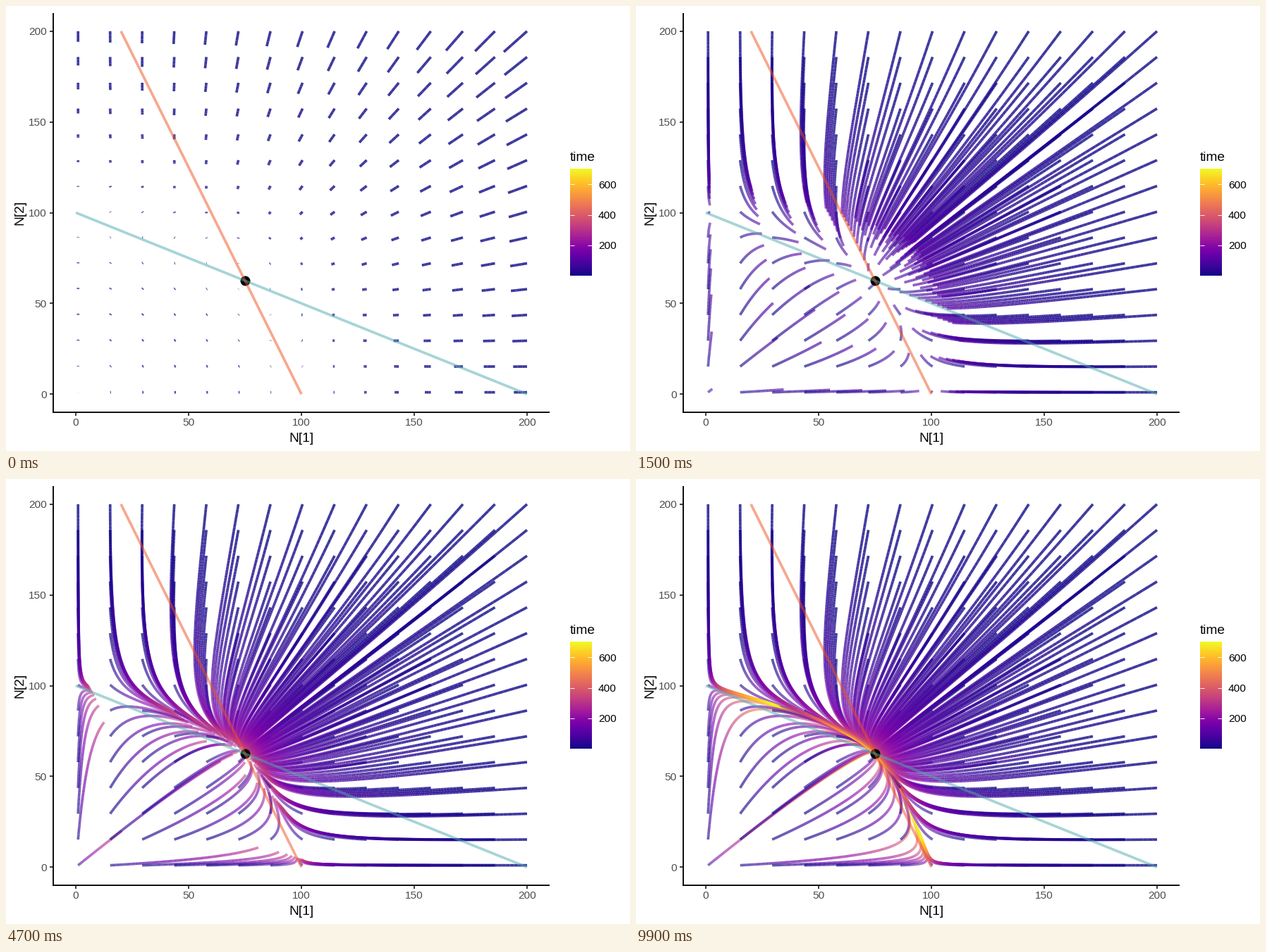
These frames come from a looping animation (885 px wide and 632 px high, 10000 ms). A matplotlib script:

```python
import numpy as np
import matplotlib.pyplot as plt
from matplotlib.animation import FuncAnimation
from matplotlib.collections import PathCollection
from matplotlib.path import Path

W, H, DPI = 885, 632, 100
FRAMES, STEPS, RATE = 100, 699, 0.01
LEFT, RIGHT, TOP, BOTTOM = 67, 771, 10, 577
PT = 72 / DPI
ALPHA = 0.8
PIECE = 2.0  # shortest drawn piece of a trajectory, in pixels

plt.rcParams["font.family"] = "Liberation Sans"
plasma = plt.get_cmap("plasma")


def px(n):
    return LEFT + (RIGHT - LEFT) * (n + 10) / 220


def py(n):
    return BOTTOM - (BOTTOM - TOP) * (n + 10) / 220


def simulate():
    """Discrete two-species competition from a grid of starting densities."""
    start = np.linspace(1, 200, 15)
    n1, n2 = (g.ravel() for g in np.meshgrid(start, start))
    out = np.empty((n1.size, STEPS + 1, 2))
    for k in range(STEPS + 1):
        out[:, k] = np.column_stack([px(n1), py(n2)])
        d1 = RATE * n1 * (1 - (n1 + 0.4 * n2) / 100)
        d2 = RATE * n2 * (1 - (n2 + 0.5 * n1) / 100)
        n1, n2 = n1 + d1, n2 + d2
    return out


def split(track):
    """Step indices that cut a track into pieces of at least PIECE pixels."""
    step = np.hypot(*np.diff(track, axis=0).T)
    cuts, run = [0], 0.0
    for k, d in enumerate(step, 1):
        run += d
        if run >= PIECE:
            cuts.append(k)
            run = 0.0
    if cuts[-1] < STEPS:
        cuts.append(STEPS)
    return np.array(cuts)


def opacity(length, count):
    """Opacity of a chain of translucent butt-ended steps of subpixel size."""
    step = length / count
    seam = ALPHA ** 2 / 6
    target = np.where(step > 1, ALPHA - seam / np.maximum(step, 1),
                      0.55 + (ALPHA - seam - 0.55) * step)
    return np.minimum(target + target ** 2 / 6 / np.maximum(length, 1), ALPHA)


tracks = simulate()
cuts = [split(t) for t in tracks]
owner = np.concatenate([np.full(len(c) - 1, i) for i, c in enumerate(cuts)])
first = np.concatenate([c[:-1] for c in cuts])
last = np.concatenate([c[1:] for c in cuts])

ends = np.stack([tracks[owner, first], tracks[owner, last]], axis=1)
lengths = np.hypot(*(ends[:, 1] - ends[:, 0]).T)
colors = plasma((first + last) / 2 / STEPS)
colors[:, 3] = opacity(lengths, last - first)
pieces = [Path(e) for e in ends]

fig = plt.figure(figsize=(W / DPI, H / DPI), dpi=DPI, facecolor="white")
ax = fig.add_axes([0, 0, 1, 1])
ax.set_xlim(0, W)
ax.set_ylim(H, 0)
ax.axis("off")


def line(xs, ys, color, width, **kw):
    ax.plot(xs, ys, color=color, lw=width * PT, solid_capstyle="butt", **kw)


def label(x, y, text, size, color="black", ha="left", rotation=0):
    ax.text(x, y, text, fontsize=size * PT, color=color, ha=ha, va="baseline",
            rotation=rotation, rotation_mode="anchor")


def draw_axes():
    line([LEFT, LEFT], [BOTTOM + 0.9, TOP], "black", 1.85, zorder=4)
    line([LEFT - 0.9, RIGHT], [BOTTOM, BOTTOM], "black", 1.85, zorder=4)
    for v in range(0, 201, 50):
        line([px(v)] * 2, [BOTTOM, BOTTOM + 4.8], "#333333", 1.85)
        line([LEFT - 4.8, LEFT], [py(v)] * 2, "#333333", 1.85)
        label(px(v), 596.5, str(v), 15.4, "#4D4D4D", "center")
        label(58, py(v) + 5.5, str(v), 15.4, "#4D4D4D", "right")
    label((LEFT + RIGHT) / 2, 619, "N[1]", 19.2, ha="center")
    label(24, (TOP + BOTTOM) / 2, "N[2]", 19.2, ha="center", rotation=90)


def draw_legend():
    x0, x1, y0, y1 = 800, 830.5, 231.7, 383
    ramp = np.linspace(1, 0, 256)[:, None]
    ax.imshow(ramp, cmap=plasma, extent=[x0, x1, y1, y0], aspect="auto",
              interpolation="bilinear")
    for v in (200, 400, 600):
        y = y1 - (y1 - y0) * (v - 1) / STEPS
        line([x0, x0 + 6], [y, y], "white", 0.9)
        line([x1 - 6, x1], [y, y], "white", 0.9)
        label(840, y + 5.5, str(v), 15.4)
    label(800, 220, "time", 19.2)


draw_axes()
draw_legend()
ax.set_xlim(0, W)
ax.set_ylim(H, 0)

flow = PathCollection([], facecolors="none", linewidths=3.7 * PT,
                      transform=ax.transData, zorder=3)
flow.set_snap(False)
ax.add_collection(flow, autolim=False)

ax.plot(px(75), py(62.5), "o", color="black", ms=14 * PT, mew=0, zorder=5)
line([px(100), px(20)], [py(0), py(200)], "#EF521E", 3.7, alpha=0.5, zorder=6)
line([px(0), px(200)], [py(100), py(0)], "#50AAAE", 3.7, alpha=0.5, zorder=7)


def update(i):
    now = min(int(STEPS / (FRAMES - 1) * (i + 0.5)), STEPS)
    shown = np.flatnonzero(first < now)
    paths = []
    for k in shown:
        if last[k] <= now:
            paths.append(pieces[k])
        else:
            t = tracks[owner[k]]
            paths.append(Path([t[first[k]], t[now]]))
    flow.set_paths(paths)
    flow.set_edgecolor(colors[shown])
    return [flow]


anim = FuncAnimation(fig, update, frames=FRAMES, interval=100,
                     repeat=True, repeat_delay=0, blit=False)
plt.show()
```
